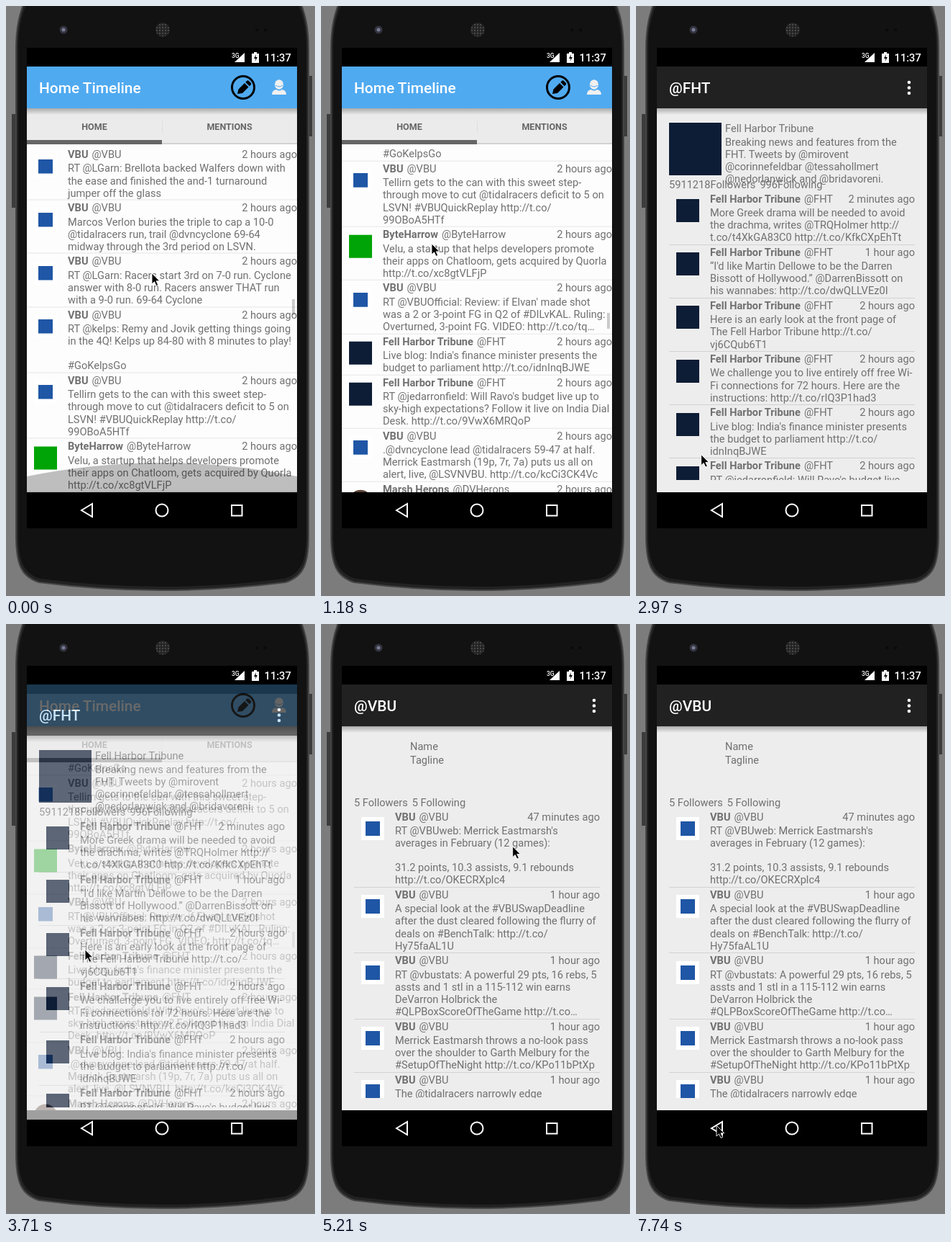
Write an HTML page that moves like this. It is 430 px wide and 819 px high and loops after 8000 ms.

```html
<!DOCTYPE html>
<html lang="en">
<head>
<meta charset="utf-8">
<title>Timeline app</title>
<style>
html, body { margin: 0; width: 100%; height: 100%; overflow: hidden; background: #7c7c7c; }
body { position: relative; font: 14.62px/17.13px Roboto, sans-serif; color: #707070; }
body > svg { position: absolute; left: 0; top: 0; }
div { box-sizing: border-box; }
#screen { position: absolute; left: 29px; top: 58px; width: 376px; height: 667px; overflow: hidden; background: #000; }
.page { position: absolute; left: 0; top: 0; width: 376px; height: 617px; background: #ededed; }
.page > * { position: absolute; white-space: pre; }
.strip { width: 376px; height: 26px; background: #000; }
.bar { top: 26px; width: 376px; height: 58px; padding-left: 17px; background: #212121; color: #fff; font: 500 20.9px/60px Roboto, sans-serif; }
.bar svg { position: absolute; left: 0; top: 0; }
.shade { top: 84px; width: 376px; height: 9px; background: linear-gradient(rgba(0,0,0,.28), transparent); }
#home { background: #fdfdfd; }
#home .bar { background: #50aaf0; }
.tabs { top: 84px; width: 376px; height: 50px; background: #ebebeb; border-bottom: 2px solid #d2d2d2; }
.tabs b { position: absolute; width: 188px; height: 50px; text-align: center; font: 700 12.53px/52px Roboto, sans-serif; color: #666; }
.tabs b:first-child { border-bottom: 6px solid #666; box-sizing: border-box; }
.tabs b + b { left: 188px; }
.tabs i { position: absolute; left: 188px; top: 18px; width: 1px; height: 16px; background: #dedede; }
.list { overflow: hidden; }
#home .list { top: 134px; width: 376px; height: 483px; }
.profile .list { left: 17px; top: 199.5px; width: 342px; height: 400.5px; }
.row { position: relative; padding: 2px 0 .4px 57px; border-bottom: 1px solid #e6e6e6; }
.profile .row { border-color: #d2d2d2; }
.row p { margin: 2.3px 0 0; }
.row time { position: absolute; right: 0; top: 2px; }
.row i { position: absolute; left: 10px; top: 10.5px; width: 32px; height: 32px; }
.row b { margin-right: 5px; font-weight: 700; }
.vbu { border: 6px solid #fff; box-sizing: border-box; background: #1f56a5 padding-box; }
.fht { background: #0e1d36; }
.byte { background: #00a406; }
.heron { background: #5a4238; border-radius: 50%; }
.thumb { position: absolute; left: 17px; top: 104px; width: 73px; height: 73px; }
#scrollbar { left: 369px; width: 4px; height: 22px; background: rgba(0,0,0,.2); }
#glow { left: 0; top: 560px; }
</style>
</head>
<body>
<svg width="430" height="819">
  <defs><pattern id="grille" width="4" height="4" patternUnits="userSpaceOnUse"><circle cx="2" cy="2" r="1.2" fill="#4a4a4a"/></pattern></defs>
  <path d="M8 150h7v130h-7zM420 97h6v84h-6z" fill="#3c3c3c"/>
  <path d="M25-5C19 12 14 28 14 60V735C14 775 21 792 46 800Q217 822 389 800C414 792 421 775 421 735V60C421 28 416 12 410-5Z" fill="#222" stroke="#444" stroke-width="2"/>
  <path d="M30-5C22 12 17 28 17 60V733C17 770 24 788 48 795Q217 817 387 795C411 788 418 770 418 733V60C418 28 413 12 405-5Z" fill="#121212"/>
  <circle cx="80" cy="33" r="5.5" fill="#343440"/><circle cx="80" cy="33" r="2.5" fill="#777b92"/>
  <circle cx="218" cy="33" r="10" fill="#222"/><circle cx="218" cy="33" r="9.5" fill="url(#grille)"/>
  <path d="M347 33h4M359 33h4" stroke="#0a0a0a" stroke-width="4"/>
</svg>
<div id="screen">
  <div class="page" id="home">
    <div class="strip"></div>
    <div class="list"></div>
    <div id="scrollbar"></div>
    <svg id="glow" width="376" height="57"><path d="M0 57V35Q188-3 376 35V57Z" fill="#000" opacity=".25"/></svg>
    <div class="tabs"><b>HOME</b><b>MENTIONS</b><i></i></div>
    <div class="shade"></div>
    <div class="bar">Home Timeline<svg width="376" height="58">
      <circle cx="301" cy="29" r="15.5" fill="none" stroke="#000" stroke-width="3"/>
      <path d="M293 38l1.5-6.500 8.500-8.500 5.500 5.500-8.500 8.500zM304.300 21.700l2-2q1.200-1 2.400 0l3.100 3.100q1 1.200 0 2.400l-2 2z"/>
      <path d="M341 39q0-6 6-7 4 3 8 0 6 1 6 7z" fill="#f0f0f0"/><ellipse cx="351" cy="25" rx="6" ry="6.800" fill="#f0f0f0"/>
      <path d="M346 26q5 4 10 0" fill="none" stroke="#50aaf0"/>
    </svg></div>
  </div>
</div>
<svg width="430" height="819" fill="none">
  <path d="M29 58h376v26H29z" fill="#000"/>
  <g fill="#fff" font-family="Roboto, sans-serif" font-weight="500">
    <text x="359.600" y="77" font-size="14.620">11:37</text><text x="314" y="72" font-size="8.500">3G</text>
    <path d="M332 65v13h-14z"/><path d="M342 66h3v-2h4v2h3v13h-10z"/>
  </g>
  <path d="M348 67l-3 6h2.500l-1 4 3.500-6h-2.500z" fill="#000"/>
  <g stroke="#fff" stroke-width="2"><path d="M105 700l15-9v18zM314 693h14.500v14.500h-14.500z"/><circle cx="217" cy="700" r="8.500"/></g>
  <path id="cursor" d="M0 0v15l3.500-3.200 2.600 5.600 2.600-1.200-2.600-5.400h4.700z" fill="#000" stroke="#fff" stroke-width=".9"/>
</svg>
<script>
const accounts = {
  vbu: ['VBU', '@VBU'],
  fht: ['Fell Harbor Tribune', '@FHT'],
  byte: ['ByteHarrow', '@ByteHarrow'],
  heron: ['Marsh Herons', '@DVHerons']
};

const row = ([who, text, when = '2 hours ago']) => {
  const [name, handle] = accounts[who];
  return `<div class="row"><i class="${who}"></i><b>${name}</b>${handle}<time>${when}</time><p>${text}</p></div>`;
};

const homeRows = [
  ['vbu', 'RT @LGarn: Brellota backed Walfers down with\nthe ease and finished the and-1 turnaround\njumper off the glass'],
  ['vbu', 'Marcos Verlon buries the triple to cap a 10-0\n@tidalracers run, trail @dvncyclone 69-64\nmidway through the 3rd period on LSVN.'],
  ['vbu', 'RT @LGarn: Racers start 3rd on 7-0 run. Cyclone\nanswer with 8-0 run. Racers answer THAT run\nwith a 9-0 run. 69-64 Cyclone'],
  ['vbu', 'RT @kelps: Remy and Jovik getting things going\nin the 4Q! Kelps up 84-80 with 8 minutes to play!\n\n#GoKelpsGo'],
  ['vbu', 'Tellirn gets to the can with this sweet step-\nthrough move to cut @tidalracers deficit to 5 on\nLSVN! #VBUQuickReplay http://t.co/\n99OBoA5HTf'],
  ['byte', 'Velu, a startup that helps developers promote\ntheir apps on Chatloom, gets acquired by Quorla\nhttp://t.co/xc8gtVLFjP'],
  ['vbu', "RT @VBUOfficial: Review: if Elvan' made shot\nwas a 2 or 3-point FG in Q2 of #DILvKAL. Ruling:\nOverturned, 3-point FG. VIDEO: http://t.co/tq…"],
  ['fht', "Live blog: India's finance minister presents the\nbudget to parliament http://t.co/idnInqBJWE"],
  ['fht', "RT @jedarronfield: Will Ravo's budget live up to\nsky-high expectations? Follow it live on India Dial\nDesk. http://t.co/9VwX6MRQoP"],
  ['vbu', '.@dvncyclone lead @tidalracers 59-47 at half.\nMerrick Eastmarsh (19p, 7r, 7a) puts us all on\nalert, live, @LSVNVBU. http://t.co/kcCi3CK4Vc'],
  ['heron', 'Good morning from camp!']
];

const paperRows = [
  ['fht', 'More Greek drama will be needed to avoid\nthe drachma, writes @TRQHolmer http://\nt.co/t4XkGA83C0 http://t.co/KfkCXpEhTt', '2 minutes ago'],
  ['fht', "“I'd like Martin Dellowe to be the Darren\nBissott of Hollywood.” @DarrenBissott on\nhis wannabes: http://t.co/dwQLLVEz0I", '1 hour ago'],
  ['fht', 'Here is an early look at the front page of\nThe Fell Harbor Tribune http://t.co/\nvj6CQub6T1'],
  ['fht', 'We challenge you to live entirely off free Wi-\nFi connections for 72 hours. Here are the\ninstructions: http://t.co/rIQ3P1had3'],
  ['fht', "Live blog: India's finance minister presents\nthe budget to parliament http://t.co/\nidnInqBJWE"],
  ['fht', "RT @jedarronfield: Will Ravo's budget live\nup to sky-high expectations?"]
];

const leagueRows = [
  ['vbu', "RT @VBUweb: Merrick Eastmarsh's\naverages in February (12 games):\n\n31.2 points, 10.3 assists, 9.1 rebounds\nhttp://t.co/OKECRXplc4", '47 minutes ago'],
  ['vbu', 'A special look at the #VBUSwapDeadline\nafter the dust cleared following the flurry of\ndeals on #BenchTalk: http://t.co/\nHy75faAL1U', '1 hour ago'],
  ['vbu', 'RT @vbustats: A powerful 29 pts, 16 rebs, 5\nassts and 1 stl in a 115-112 win earns\nDeVarron Holbrick the\n#QLPBoxScoreOfTheGame http://t.co…', '1 hour ago'],
  ['vbu', 'Merrick Eastmarsh throws a no-look pass\nover the shoulder to Garth Melbury for the\n#SetupOfTheNight http://t.co/KPo11bPtXp', '1 hour ago'],
  ['vbu', 'The @tidalracers narrowly edge\nthe visitors', '1 hour ago']
];

const label = (x, y, text) => `<div style="position:absolute;left:${x}px;top:${y}px">${text}</div>`;
const header = (name, tagline, followers, following) =>
  label(95, 103.5, name) + label(95, 123, tagline) +
  label(17, 181.5, `${followers}Followers<span style="margin-left:6px">${following}Following</span>`);

const emptyHeader = header('Name', 'Tagline', '5 ', '5 ');
const paperHeader = '<div class="thumb fht"></div>' + header('Fell Harbor Tribune',
  'Breaking news and features from the\nFHT. Tweets by @mirovent\n@corinnefeldbar @tessahollmert\n@nedorlanwick and @bridavoreni.',
  '5911218', '996');

const $ = id => document.getElementById(id);

function addProfile(handle, rows) {
  const page = document.createElement('div');
  page.className = 'page profile';
  page.innerHTML = `<div class="strip"></div><div class="bar">${handle}<svg width="376" height="58" fill="#fff">
    <circle cx="351" cy="22" r="2.300"/><circle cx="351" cy="29.500" r="2.300"/><circle cx="351" cy="37" r="2.300"/></svg></div>
    <div class="shade"></div><div class="head">${emptyHeader}</div><div class="list">${rows.map(row).join('')}</div>`;
  $('screen').append(page);
  return { page, head: page.querySelector('.head'), list: page.querySelector('.list') };
}

const homeList = document.querySelector('#home .list');
homeList.innerHTML = `<div>${homeRows.map(row).join('')}</div>`;
const paper = addProfile('@FHT', paperRows);
const league = addProfile('@VBU', leagueRows);

// Linear interpolation along [tick, ...values] points.
function along(points, tick) {
  const next = points.findIndex(p => p[0] > tick);
  if (next < 1) return points.at(next).slice(1);
  const [a, b] = [points[next - 1], points[next]];
  const u = (tick - a[0]) / (b[0] - a[0]);
  return a.slice(1).map((v, i) => v + (b[i + 1] - v) * u);
}

const cursorPath = [
  [0, 203, 371], [8, 154, 330], [12, 52, 472], [16, 52, 472], [22, 110, 698], [23, 110, 698],
  [25, 110, 452], [28, 58, 408], [29, 54, 404], [33, 54, 404], [36, 373, 261], [38, 373, 261],
  [43, 134, 690], [46, 123, 695], [48, 118, 696], [50, 118, 696], [52, 112, 696]
];
// [tick, slide, opacity]
const paperSlide = [[13, 40, 0], [14, 16, .78], [15, 4, .96], [16, 0, 1], [23, 0, 1], [24, 3, .95], [25, 13, .67], [26, 32, .2], [27, 50, 0]];
const leagueSlide = [[30, 45, 0], [31, 19, .73], [32, 5, .95], [33, 0, 1]];

function place({ page }, slide, tick) {
  const [y, opacity] = along(slide, tick);
  page.style.transform = `translateY(${y}px)`;
  page.style.opacity = opacity;
  page.style.visibility = opacity ? 'visible' : 'hidden';
}

const show = (el, on) => el.style.display = on ? '' : 'none';
let paperLoaded = false;

function draw() {
  const tick = Math.min(52, Math.floor((performance.now() % 8000 + 16) / 148.8));
  const fling = Math.min(1, Math.max(0, (tick - 1) / 11));
  const scroll = 299 * (1 - (1 - fling) ** 4);

  homeList.firstChild.style.transform = `translateY(${3.5 - scroll}px)`;
  $('scrollbar').style.top = 349 + scroll * .066 + 'px';
  $('glow').style.opacity = Math.max(0, 1 - tick / 3);

  place(paper, paperSlide, tick);
  place(league, leagueSlide, tick);
  show(paper.list, tick >= 18);
  show(league.list, tick >= 34);
  if (paperLoaded !== tick >= 18) {
    paperLoaded = !paperLoaded;
    paper.head.innerHTML = paperLoaded ? paperHeader : emptyHeader;
  }

  $('cursor').setAttribute('transform', `translate(${along(cursorPath, tick)})`);
  requestAnimationFrame(draw);
}
draw();
</script>
</body>
</html>
```
